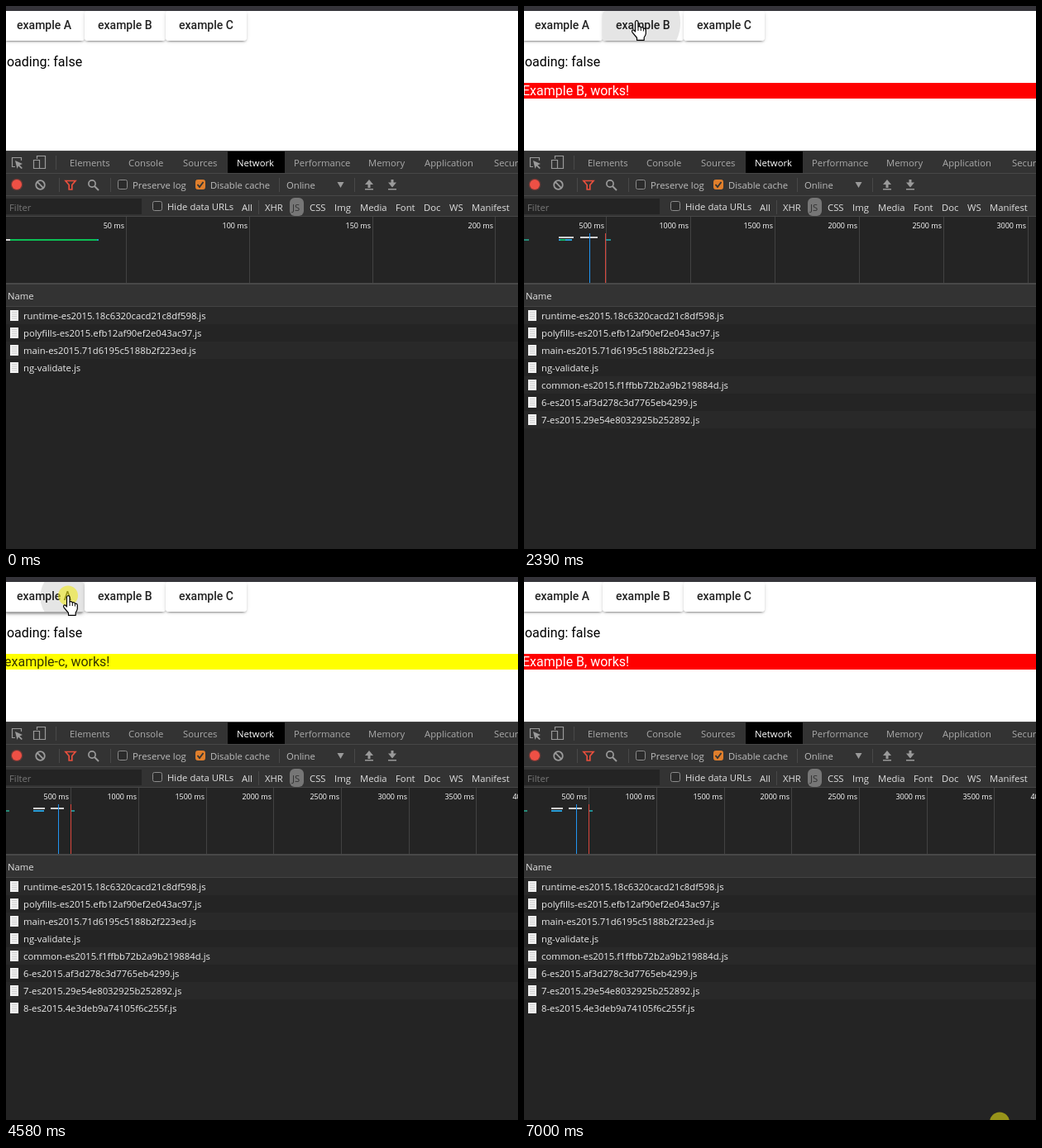
Recreate the animation shown at these times as an HTML page with a canvas. Size 619 by 657 pixels, loop 7.08 s.

```html
<!DOCTYPE html>
<html lang="en">
<head>
<meta charset="utf-8">
<title>Lazy loaded modules</title>
<style>
  html, body { margin: 0; width: 100%; height: 100%; overflow: hidden; background: #242424; }
  canvas { display: block; width: 619px; height: 657px; }
</style>
</head>
<body>
<canvas id="stage" width="619" height="657"></canvas>
<script>
const W = 619, H = 657, LOOP = 7080;
const ctx = document.getElementById('stage').getContext('2d', { alpha: false });
const PAGE = 'Roboto, sans-serif', PANEL = '"Open Sans", "Noto Sans", sans-serif';

const bursts = [
  [120, 290, 3], [440, 750, 5], [990, 1300, 5], [1460, 1850, 6], [2150, 2550, 6],
  [2700, 2700, 1], [2850, 3250, 6], [3400, 4100, 10], [4180, 4350, 3],
  [4500, 5110, 9], [5270, 5270, 1], [5590, 5660, 2], [6290, 6760, 7], [7000, 7000, 1]
];
const ticks = [0];
for (const [a, b, n] of bursts)
  for (let i = 0; i < n; i++)
    ticks.push(Math.floor((a + (n > 1 ? (b - a) * i / (n - 1) : 0)) / 10) * 10);
const snap = t => ticks.reduce((last, s) => s <= t ? s : last, 0);

// Pointer path: time, x, y.
const path = [
  [120, 565, 323], [290, 152, 159], [360, 152, 159], [750, 64, 22], [1380, 64, 22],
  [1850, 136, 17], [2775, 136, 17], [3250, 237, 21], [3640, 237, 21], [4100, 101, 22],
  [4350, 75, 22], [4640, 75, 22], [5110, 70, 156], [5270, 70, 157], [6210, 70, 157],
  [6680, 560, 616], [6760, 575, 659]
];

const buttons = [
  { x: -3, y: 6, label: 'example A' },
  { x: 95, y: 6, label: 'example B' },
  { x: 193, y: 6, label: 'example C' }
];
const inner = { x: -2, y: 145, label: 'example B' };
const clicks = [
  { t: 980, x: 64, y: 24, on: buttons[0] },
  { t: 2150, x: 138, y: 20, on: buttons[1] },
  { t: 3400, x: 238, y: 23, on: buttons[2] },
  { t: 4500, x: 75, y: 24, on: buttons[0] },
  { t: 5540, x: 72, y: 157, on: inner }
];

const files = [
  'runtime-es2015.18c6320cacd21c8df598.js', 'polyfills-es2015.efb12af90ef2e043ac97.js',
  'main-es2015.71d6195c5188b2f223ed.js', 'ng-validate.js',
  'common-es2015.f1ffbb72b2a9b219884d.js', '6-es2015.af3d278c3d7765eb4299.js',
  '7-es2015.29e54e8032925b252892.js', '8-es2015.4e3deb9a74105f6c255f.js'
];
const stages = [
  { rows: 4, gap: 148.7, unit: 50 },
  { rows: 6, gap: 127.7, unit: 500 },
  { rows: 7, gap: 102.1, unit: 500 },
  { rows: 8, gap: 81.7, unit: 500 }
];

const clamp = v => Math.max(0, Math.min(1, v));

function rect(x, y, w, h, color) {
  ctx.fillStyle = color;
  ctx.fillRect(x, y, w, h);
}
function text(s, x, y, font, color, align = 'left') {
  ctx.font = font;
  ctx.textAlign = align;
  ctx.fillStyle = color;
  ctx.fillText(s, x, y);
}
function slanted(s, x, y, font, color) {
  ctx.save();
  ctx.transform(1, 0, -.22, 1, x, y);
  text(s, 0, 0, font, color);
  ctx.restore();
}
function label(s, x, y, color = '#e0e0e0') {
  text(s, x, y, '11.3px ' + PANEL, color);
}
function round(x, y, w, h, r) {
  ctx.beginPath();
  ctx.roundRect(x, y, w, h, r);
}
function disc(x, y, r, color) {
  ctx.beginPath();
  ctx.arc(x, y, r, 0, Math.PI * 2);
  ctx.fillStyle = color;
  ctx.fill();
}
function ring(x, y, r, color, width) {
  ctx.beginPath();
  ctx.arc(x, y, r, 0, Math.PI * 2);
  ctx.strokeStyle = color;
  ctx.lineWidth = width;
  ctx.stroke();
}
function shape(d, fill, stroke, width = 1) {
  const p = new Path2D(d);
  if (fill) { ctx.fillStyle = fill; ctx.fill(p); }
  if (stroke) { ctx.strokeStyle = stroke; ctx.lineWidth = width; ctx.stroke(p); }
}

// cubic-bezier(0, 0, .2, 1)
function easeOut(x) {
  let lo = 0, hi = 1;
  for (let i = 0; i < 20; i++) {
    const s = (lo + hi) / 2;
    if (.6 * (1 - s) * s * s + s * s * s < x) lo = s; else hi = s;
  }
  return 3 * (1 - lo) * lo * lo + lo * lo * lo;
}

function button(b, t) {
  const { x, y } = b, w = 98, h = 36;
  const click = clicks.find(c => c.on === b && t >= c.t && t < c.t + 560);
  const lift = click && t - click.t < 110 ? 1.6 : 1;
  const shadow = (inset, dy, blur, alpha) => {
    ctx.save();
    ctx.shadowColor = `rgba(0,0,0,${alpha})`;
    ctx.shadowOffsetY = dy * lift;
    ctx.shadowBlur = blur * lift;
    round(x + inset, y + inset, w - inset * 2, h - inset * 2, 4);
    ctx.fillStyle = '#fff';
    ctx.fill();
    ctx.restore();
  };
  shadow(0, 1, 5, .12);
  shadow(0, 2, 2, .14);
  shadow(2, 3, 1, .2);
  round(x, y, w, h, 4);
  ctx.fillStyle = '#fff';
  ctx.fill();
  text(b.label, x + 16, y + 22, '500 14px ' + PAGE, 'rgba(0,0,0,.87)');
  if (!click) return;
  const age = t - click.t;
  const far = Math.hypot(Math.max(click.x - x, x + w - click.x), Math.max(click.y - y, y + h - click.y));
  ctx.save();
  round(x, y, w, h, 4);
  ctx.clip();
  disc(click.x, click.y, far * easeOut(clamp(age / 450)), `rgba(0,0,0,${.1 * (1 - clamp((age - 250) / 300))})`);
  ctx.restore();
}

function banner(s, back, color) {
  rect(0, 93, W, 19, back);
  text(s, -2, 108, '16px ' + PAGE, color);
}

function page(t) {
  rect(0, 0, W, 176, '#fff');
  rect(0, 0, W, 6, '#35343a');
  ctx.save();
  ctx.beginPath();
  ctx.rect(0, 6, W, 170);
  ctx.clip();
  buttons.forEach(b => button(b, t));
  text('loading: false', -3, 73, '16px ' + PAGE, '#000');
  const view = t < 1140 ? '' : t < 2310 ? 'A' : t < 3550 ? 'B' : t < 4650 ? 'C' : t < 5660 ? 'A' : 'B';
  if (view === 'A') {
    rect(0, 93, 247, 1, '#c8c8c8');
    rect(246, 93, 1, 83, '#c8c8c8');
    text('Example A, works!', -2, 125, '16px ' + PAGE, '#000');
    slanted('-loaded module-', 132, 125, '16px ' + PAGE, '#000');
    button(inner, t);
  }
  if (view === 'B') banner('Example B, works!', '#f00', '#fff');
  if (view === 'C') banner('example-c, works!', '#ff0', 'rgba(0,0,0,.8)');
  ctx.restore();
}

function checkbox(x, y, on) {
  round(x + .5, y + .5, 11, 11, 2);
  ctx.fillStyle = on ? '#e07f2c' : '#2b2b2b';
  ctx.fill();
  ctx.strokeStyle = on ? '#e07f2c' : '#8c8c8c';
  ctx.lineWidth = 1;
  ctx.stroke();
  if (on) shape(`M${x + 2.5} ${y + 6}l2.5 3l4.5 -6`, null, '#333', 1.8);
}

function toolbar() {
  rect(0, 175, W, 80, '#333');
  for (const y of [175, 202, 229, 254]) rect(0, y, W, 1, '#474747');
  rect(268, 176, 69, 26, '#000');
  const tabs = { Elements: 77, Console: 148, Sources: 214, Network: 279, Performance: 348, Memory: 438, Application: 506, Security: 590 };
  for (const name in tabs) label(name, tabs[name], 194, name === 'Network' ? '#fff' : '#aaa');
  for (const [x, y] of [[60, 181], [64, 208], [126, 208], [330, 208], [421, 208], [305, 235]]) rect(x, y, 1, 17, '#484848');

  const gray = '#9a9a9a';
  shape('M11 194.500H7.500V183.500H18.500V187', null, gray, 1.2);
  shape('M11 187L20 191L16.500 192.500L20 196L18.500 197L15 193.500L13.500 197Z', gray);
  shape('M37.500 185V181.500H47.500V196.500H41M33.500 186.500H40.500V196.500H33.500Z', null, gray, 1.2);

  disc(13, 216, 7.3, 'rgba(240,70,60,.3)');
  disc(13, 216, 6, '#ee5045');
  ring(41.5, 216.5, 5.3, gray, 1.8);
  shape('M37.700 212.700L45.300 220.300', null, gray, 1.8);
  shape('M72 211.500H84L79.800 216.500V222H76.200V216.500Z', null, '#e94f3d', 1.7);
  ring(104, 215, 4.1, gray, 1.7);
  shape('M107 218L112 223', null, gray, 2);
  checkbox(135, 210);
  label('Preserve log', 153, 221, '#bdbdbd');
  checkbox(229, 210, true);
  label('Disable cache', 247, 221, '#bdbdbd');
  label('Online', 339, 221, '#bdbdbd');
  shape('M400.500 213H408.500L404.500 220Z', gray);
  shape('M439 210L444 216H440.500V220H437.500V216H434ZM434 221H444V222.500H434Z', gray);
  shape('M467 219.500L462 213.500H465.500V210H468.500V213.500H472ZM462 221H472V222.500H462Z', gray);

  rect(0, 233, 164, 19, '#242424');
  label('Filter', 4, 248, '#777');
  checkbox(177, 236);
  label('Hide data URLs', 195, 247);
  round(343, 232, 17, 22, 6);
  ctx.fillStyle = '#767676';
  ctx.fill();
  const types = { All: 285, XHR: 313, JS: 346, CSS: 367, Img: 397, Media: 428, Font: 471, Doc: 505, WS: 536, Manifest: 563 };
  for (const name in types) label(name, types[name], 248, name === 'JS' ? '#303030' : '#e0e0e0');
}

function overview({ gap, unit, rows }) {
  const at = u => u * gap - 3.5;
  rect(0, 255, W, 80, '#242424');
  for (let k = 1; at(k) < W + 40; k++) {
    const x = Math.round(at(k));
    rect(x, 255, 1, 80, '#424242');
    text(k * unit + ' ms', x - 2, 269, '9px ' + PANEL, '#fff', 'right');
  }
  const bar = (a, b, y, color) => rect(Math.round(at(a)), y, Math.round(at(b)) - Math.round(at(a)), 2, color);
  if (unit === 50) {
    rect(0, 282, 5, 2, '#ddd');
    rect(5, 282, 107, 2, '#0cbf55');
    rect(110, 282, 2, 2, '#189fc0');
    return;
  }
  bar(0, .092, 282, '#278a78');
  bar(.443, .622, 279, '#d0d0d0');
  bar(.443, .6, 282, '#2b9ed8');
  if (rows < 8) bar(.465, .525, 282, '#12b262');
  bar(.7, .905, 279, '#d0d0d0');
  bar(1.005, 1.06, 282, '#258f94');
  rect(Math.round(at(.812)), 275, 1, 60, '#2196f3');
  rect(Math.round(at(.998)), 275, 1, 60, '#d9473d');
}

function fileRow(name, i) {
  const y = 364 + i * 21;
  if (i % 2 === 0) rect(0, y, W, 21, '#292929');
  rect(5, y + 4, 10, 13, '#f2f2f2');
  for (let k = 0; k < 4; k++) rect(7, y + 6 + k * 2.5, 6, 1, '#cfcfcf');
  label(name, 21, y + 15, '#ececec');
}

function panel(t) {
  const stage = stages[t < 1140 ? 0 : t < 2310 ? 1 : t < 3550 ? 2 : 3];
  rect(0, 175, W, H - 175, '#242424');
  toolbar();
  overview(stage);
  rect(0, 335, W, 2, '#484848');
  rect(0, 337, W, 26, '#333');
  rect(0, 363, W, 1, '#444');
  label('Name', 2, 355);
  files.slice(0, stage.rows).forEach(fileRow);
}

function pointerAt(t) {
  const i = path.findIndex(p => p[0] > t);
  if (i < 0) return path[path.length - 1].slice(1);
  const [t0, x0, y0] = path[i - 1], [t1, x1, y1] = path[i];
  const k = (t - t0) / (t1 - t0);
  return [x0 + (x1 - x0) * k, y0 + (y1 - y0) * k];
}

function pointer(t) {
  if (t < 120) return;
  const [x, y] = pointerAt(t);
  const pressed = t >= 7000 || clicks.some(c => t >= c.t && t < c.t + 110);
  if (pressed) disc(x, y + .5, 12, 'rgba(240,232,20,.57)');
  const hand = y < 44 && x < 291 || t >= 5000 && t < 6290;
  ctx.save();
  ctx.lineJoin = 'round';
  if (hand) {
    ctx.translate(Math.round(x) - 6, Math.round(y));
    shape('M4.500 14V2.500Q4.500 .6 6.300 .6Q8 .6 8 2.500V8Q10.500 7 11.300 9Q13.700 8 14.400 10.200Q17.200 9.700 17.300 12.500V16.500Q17 18.500 15.200 21V24.300H6.500V21.500L1 14.800Q0 12.700 1.500 12Q2.800 11.600 4.500 14Z', '#fff', '#000', 1.2);
    shape('M8 8V13M11.300 9V13M14.400 10.200V13.500', null, '#000', 1);
  } else {
    ctx.translate(Math.round(x) + .5, Math.round(y) + .5);
    shape('M0 0V16.500L4 13L6.500 18.500L9 17.500L6.600 12H11.500Z', '#fff', '#000', 1);
  }
  ctx.restore();
}

function frame(now) {
  const t = snap(now % LOOP);
  page(t);
  panel(t);
  pointer(t);
  requestAnimationFrame(frame);
}
requestAnimationFrame(frame);
</script>
</body>
</html>
```
